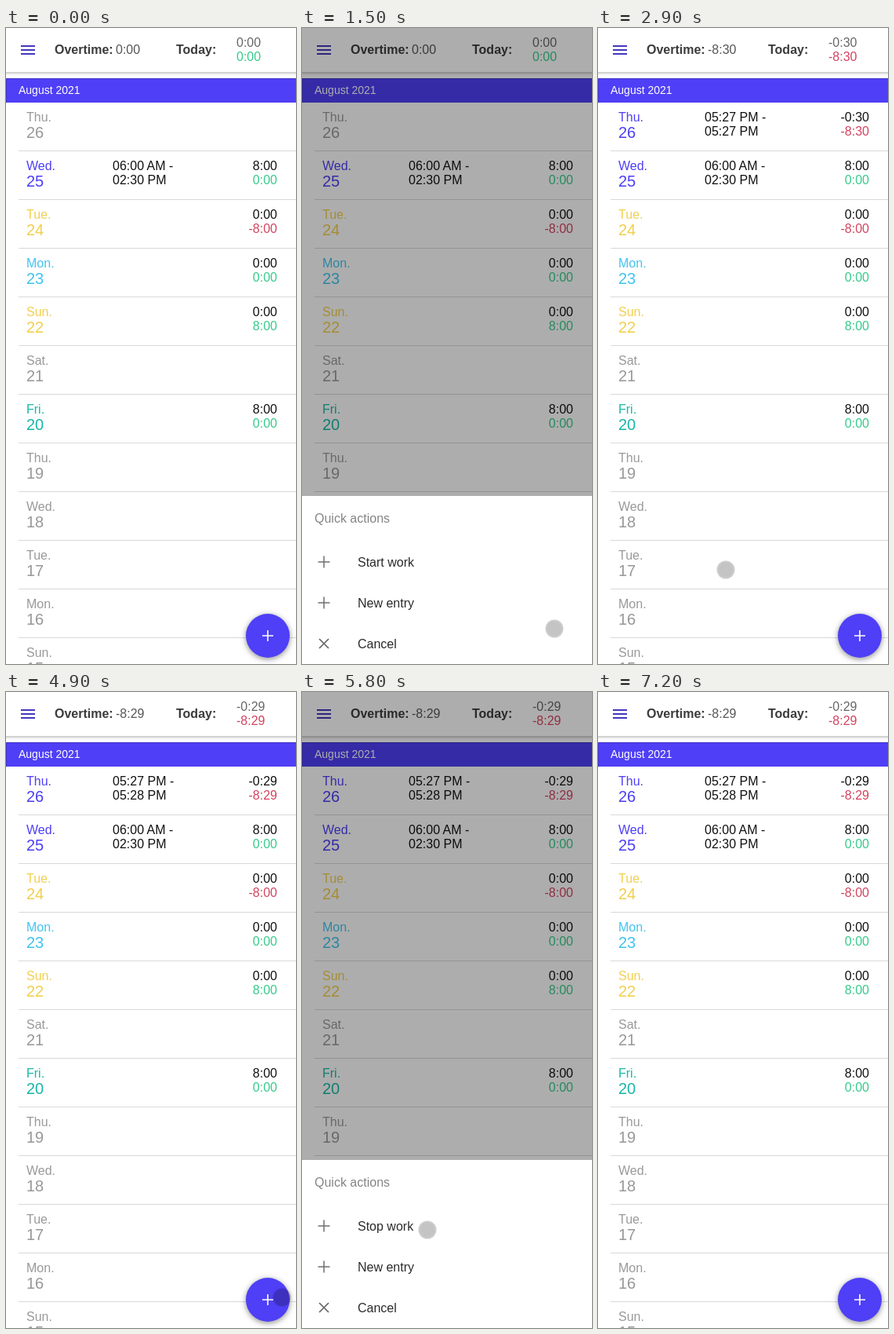
An HTML page for the animation above (7300 ms loop, 370 by 810 pixels).

```html
<!DOCTYPE html>
<html lang="en">
<head>
<meta charset="utf-8">
<title>Overtime tracker</title>
<style>
  html, body { margin: 0; width: 100%; height: 100%; overflow: hidden; background: #fff; }
  svg { display: block; width: 370px; height: 810px; }
  text { font: 16px "Liberation Sans", Arial, sans-serif; white-space: pre; }
  .bold { font-weight: bold; }
  .day { font-size: 20px; }
  .month { font-size: 14px; }
  .end { text-anchor: end; }
  .header { filter: drop-shadow(0 1px 2px rgba(0,0,0,.34)); }
  .fab { filter: drop-shadow(0 2px 3px rgba(0,0,0,.32)) drop-shadow(0 1px 5px rgba(0,0,0,.14)); }
</style>
</head>
<body>
<svg id="stage" viewBox="0 0 370 810"></svg>
<script>
const LOOP = 7300, STEP = 100, SHEET_HEIGHT = 214;
const PURPLE = '#4f3ff6', GREEN = '#35cb8a', RED = '#d3435f', YELLOW = '#f2cf4c',
      BLUE = '#42c4ee', TEAL = '#18b8a6', GREY = '#999', BLACK = '#111';
const stage = document.getElementById('stage');

function add(parent, tag, attrs = {}, content = '') {
  const node = document.createElementNS('http://www.w3.org/2000/svg', tag);
  for (const key in attrs) node.setAttribute(key, attrs[key]);
  node.textContent = content;
  return parent.appendChild(node);
}
const label = (parent, x, y, content, fill, cls = '') =>
  add(parent, 'text', { x, y, fill, class: cls }, content);
const box = (parent, x, y, width, height, fill) =>
  add(parent, 'rect', { x, y, width, height, fill });
const stroke = (parent, d, color, width) =>
  add(parent, 'path', { d, stroke: color, 'stroke-width': width, fill: 'none' });

function write(node, content, fill) {
  node.textContent = content;
  if (fill) node.setAttribute('fill', fill);
}

// Day list
const names = ['Sun.', 'Mon.', 'Tue.', 'Wed.', 'Thu.', 'Fri.', 'Sat.'];
const entries = {
  25: [PURPLE, '8:00', '0:00', '06:00 AM -', '02:30 PM'],
  24: [YELLOW, '0:00', '-8:00'],
  23: [BLUE, '0:00', '0:00'],
  22: [YELLOW, '0:00', '8:00'],
  20: [TEAL, '8:00', '0:00']
};
const balanceColor = value => value.startsWith('-') ? RED : GREEN;

function addRow(index) {
  const day = 26 - index, y = 95 + index * 62;
  const [color, worked = '', balance = '', from = '', to = ''] = entries[day] || [GREY];
  box(stage, 16, y + 61, 354, 1, '#d9d9d9');
  return {
    name: label(stage, 26, y + 24, names[(day + 6 - 5 + 6) % 7], color),
    day: label(stage, 26, y + 45, day, color, 'day'),
    from: label(stage, 136, y + 24, from, BLACK),
    to: label(stage, 136, y + 42, to, BLACK),
    worked: label(stage, 346, y + 24, worked, BLACK, 'end'),
    balance: label(stage, 346, y + 42, balance, balanceColor(balance), 'end')
  };
}

box(stage, 0, 0, 370, 810, '#fff');
const rows = Array.from({ length: 12 }, (_, i) => addRow(i));
rows.forEach((row, i) => write(row.name, names[(4 - i + 14) % 7]));
const today = rows[0];

// Header
add(stage, 'rect', { x: -4, y: -4, width: 378, height: 60, fill: '#fff', class: 'header' });
stroke(stage, 'M19 23h18M19 28h18M19 33h18', '#4437bd', 2);
label(stage, 62, 33, 'Overtime:', '#3c3c3c', 'bold');
label(stage, 217, 33, 'Today:', '#3c3c3c', 'bold');
const overtime = label(stage, 140, 33, '', '#555');
const todayWorked = label(stage, 294, 24, '', '#666');
const todayBalance = label(stage, 294, 42, '', GREEN);

// Month bar
box(stage, 0, 64, 370, 31, PURPLE);
stroke(stage, 'M.5 95V64.5H370', '#4033c4', 1);
label(stage, 16, 84, 'August 2021', '#fff', 'month');

// Floating button
add(stage, 'circle', { cx: 334, cy: 774, r: 28, fill: PURPLE, class: 'fab' });
stroke(stage, 'M327 774h14M334 767v14', '#fff', 1.6);

// Action sheet
const backdrop = box(stage, 0, 0, 370, 810, '#000');
const sheet = add(stage, 'g');
box(sheet, 0, 596, 370, SHEET_HEIGHT, '#fff');
label(sheet, 16, 630, 'Quick actions', '#858585');
stroke(sheet, 'M20.5 680h15M28 672.5v15M20.5 732h15M28 724.5v15', '#707070', 1.5);
stroke(sheet, 'M22 778l12 12M34 778l-12 12', '#666', 1.7);
const workAction = label(sheet, 71, 686, '', '#2b2b2b');
label(sheet, 71, 738, 'New entry', '#2b2b2b');
label(sheet, 71, 790, 'Cancel', '#2b2b2b');

// Touch pointer
const pointer = add(stage, 'g');
add(pointer, 'circle', { r: 11.5, fill: 'rgba(0,0,0,.2)' });
add(pointer, 'circle', { r: 9.5, fill: 'rgba(0,0,0,.04)' });

// Pointer stops: time, x, y
const path = [
  [500, 310, -15], [900, 325, 765], [1500, 322, 765], [2000, 141, 687], [2100, 140, 687],
  [2400, 140, 687], [2900, 163, 690], [3150, 390, 460], [3160, 390, -15],
  [4200, 310, -15], [4800, 352, 771], [4900, 352, 771], [5100, 351, 770], [5750, 160, 685],
  [6300, 160, 685], [6900, 325, 180], [7050, 328, -20]
];
const sheets = [{ open: 1050, close: 2305 }, { open: 5009, close: 6205 }];

const clamp = v => Math.min(1, Math.max(0, v));
const smooth = v => v * v * (3 - 2 * v);

// cubic-bezier(.36, .66, .04, 1)
function sheetEase(x) {
  const curve = (s, a, b) => 3 * a * s * (1 - s) ** 2 + 3 * b * s * s * (1 - s) + s ** 3;
  let low = 0, high = 1;
  for (let i = 0; i < 20; i++) {
    const mid = (low + high) / 2;
    if (curve(mid, .36, .04) < x) low = mid; else high = mid;
  }
  return curve(high, .66, 1);
}

function pointerAt(t) {
  const next = path.findIndex(stop => stop[0] > t);
  if (next < 1) return path[0].slice(1);
  const [t0, x0, y0] = path[next - 1], [t1, x1, y1] = path[next];
  const k = smooth((t - t0) / (t1 - t0));
  return [x0 + (x1 - x0) * k, y0 + (y1 - y0) * k];
}

function showTimes(t) {
  const started = t >= 2500, later = t >= 4200;
  const worked = !started ? '0:00' : later ? '-0:29' : '-0:30';
  const balance = !started ? '0:00' : later ? '-8:29' : '-8:30';
  write(overtime, balance);
  write(todayWorked, worked);
  write(todayBalance, balance, balanceColor(balance));
  write(today.name, 'Thu.', started ? PURPLE : GREY);
  write(today.day, '26', started ? PURPLE : GREY);
  write(today.from, started ? '05:27 PM -' : '');
  write(today.to, !started ? '' : later ? '05:28 PM' : '05:27 PM');
  write(today.worked, started ? worked : '');
  write(today.balance, started ? balance : '', RED);
}

function showSheet(t) {
  const { open, close } = sheets[t < 4200 ? 0 : 1];
  const shown = sheetEase(clamp((t - open) / 400));
  const hidden = clamp((t - close) / 90);
  const dim = (1 - (1 - shown) ** 2.55) * (1 - clamp((t - close) / 250)) ** 2;
  const offset = SHEET_HEIGHT * (1 - shown * (1 - hidden));
  backdrop.setAttribute('opacity', .32 * dim);
  sheet.setAttribute('transform', `translate(0 ${offset})`);
  write(workAction, t < 4200 ? 'Start work' : 'Stop work');
}

const begin = performance.now();
function draw() {
  const elapsed = (performance.now() - begin) % LOOP;
  const t = Math.floor(elapsed / STEP) * STEP;
  showTimes(t);
  showSheet(t);
  pointer.setAttribute('transform', `translate(${pointerAt(t)})`);
  requestAnimationFrame(draw);
}
draw();
</script>
</body>
</html>
```
